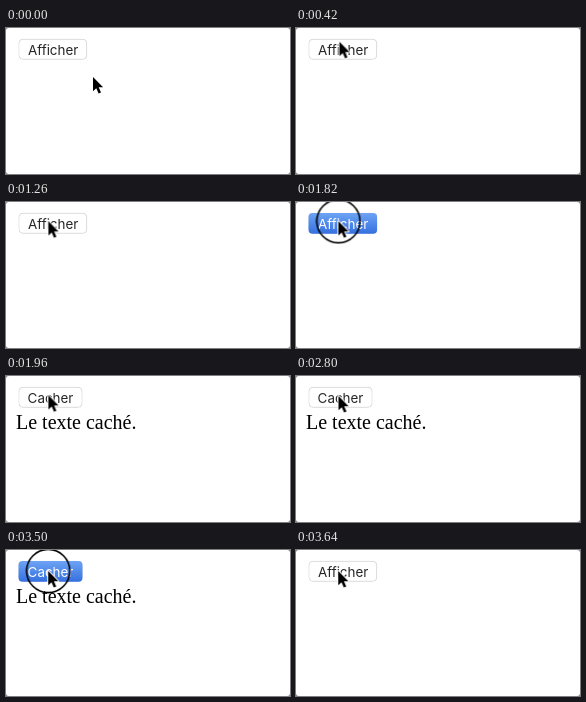
Recreate the animation shown at these times as an HTML page. Size 284 by 146 pixels, loop 3850 ms.

```html
<!DOCTYPE html>
<html lang="fr">
<head>
<meta charset="utf-8">
<title>Afficher / Cacher</title>
<style>
  html, body { margin: 0; width: 100%; height: 100%; overflow: hidden; background: #858585; }
  svg { display: block; width: 284px; height: 146px; }

  .label { font: 13.4px Inter, Roboto, sans-serif; fill: #262626; }
  .body { font: 20px "Liberation Serif", serif; fill: #000; }
  .face { fill: #fff; stroke: rgba(0, 0, 0, .13); stroke-width: .7; filter: drop-shadow(0 .7px .5px rgba(0, 0, 0, .28)); }
  .blue { fill: url(#blue); opacity: 0; }
  .ring { fill: none; stroke: #000; stroke-width: 1.6; opacity: 0; }
  .arrow { fill: #000; stroke: #fff; stroke-width: 1.8; stroke-linejoin: round; paint-order: stroke; }

  .show, .hide, .label, .blue, .ring, .cursor { animation: 3850ms step-end infinite; }
  .show { animation-name: show; }
  .hide { animation-name: hide; }
  .label { animation-name: ink; }
  .blue { animation-name: press; }
  .ring { animation-name: ring; }
  .cursor { animation-name: move; }

  @keyframes show {
    0%, 92.727% { opacity: 1; }
    49.09% { opacity: 0; }
    100% { opacity: 1; }
  }
  @keyframes hide {
    0%, 92.727%, 100% { opacity: 0; }
    49.09% { opacity: 1; }
  }
  @keyframes press {
    0%, 49.09%, 92.727%, 100% { opacity: 0; }
    47.272%, 89.09% { opacity: 1; }
  }
  @keyframes ink {
    0%, 49.09%, 92.727%, 100% { fill: #262626; }
    47.272%, 89.09% { fill: #fff; }
  }
  @keyframes ring {
    0%, 32.727%, 50.909%, 94.545%, 100% { opacity: 0; }
    29.09%, 47.272%, 85.454% { opacity: 1; }
  }
  @keyframes move {
    0% { transform: translate(87px, 49px); }
    1.818% { transform: translate(86px, 47.5px); }
    3.636% { transform: translate(80px, 42px); }
    5.454% { transform: translate(68px, 32px); }
    7.272% { transform: translate(56px, 22.5px); }
    9.09% { transform: translate(47.5px, 15.5px); }
    10.909% { transform: translate(43.5px, 13.8px); }
    12.727% { transform: translate(41.5px, 15px); }
    14.545% { transform: translate(42.3px, 17px); }
    16.363% { transform: translate(42.4px, 18px); }
    18.181% { transform: translate(42.4px, 19.2px); }
    72.727% { transform: translate(42.5px, 20px); }
    74.545% { transform: translate(42.5px, 20.5px); }
    78.181%, 100% { transform: translate(42.2px, 21px); }
  }
</style>
</head>
<body>
<svg viewBox="0 0 284 146">
  <defs>
    <linearGradient id="blue" x2="0" y2="1">
      <stop stop-color="#6ea4f4"/>
      <stop offset="1" stop-color="#3570e0"/>
    </linearGradient>
  </defs>
  <rect width="284" height="146" rx="3" fill="#fff"/>

  <g class="show">
    <rect class="face" x="13" y="11.3" width="67.7" height="19.9" rx="4"/>
    <rect class="blue" x="12.5" y="11" width="68.6" height="20.8" rx="4"/>
    <text class="label" x="22" y="26.5">Afficher</text>
  </g>

  <g class="hide">
    <rect class="face" x="13" y="11.3" width="63" height="19.9" rx="4"/>
    <rect class="blue" x="12.5" y="11" width="64" height="20.8" rx="4"/>
    <text class="label" x="21.6" y="26.5">Cacher</text>
    <text class="body" x="10" y="53">Le texte caché.</text>
  </g>

  <g class="cursor">
    <circle class="ring" r="21.6"/>
    <path class="arrow" d="M0 0V14.3L3.3 11.2L5.6 16.6L8 15.6L5.7 10.3H10.1Z"/>
  </g>
</svg>
</body>
</html>
```
